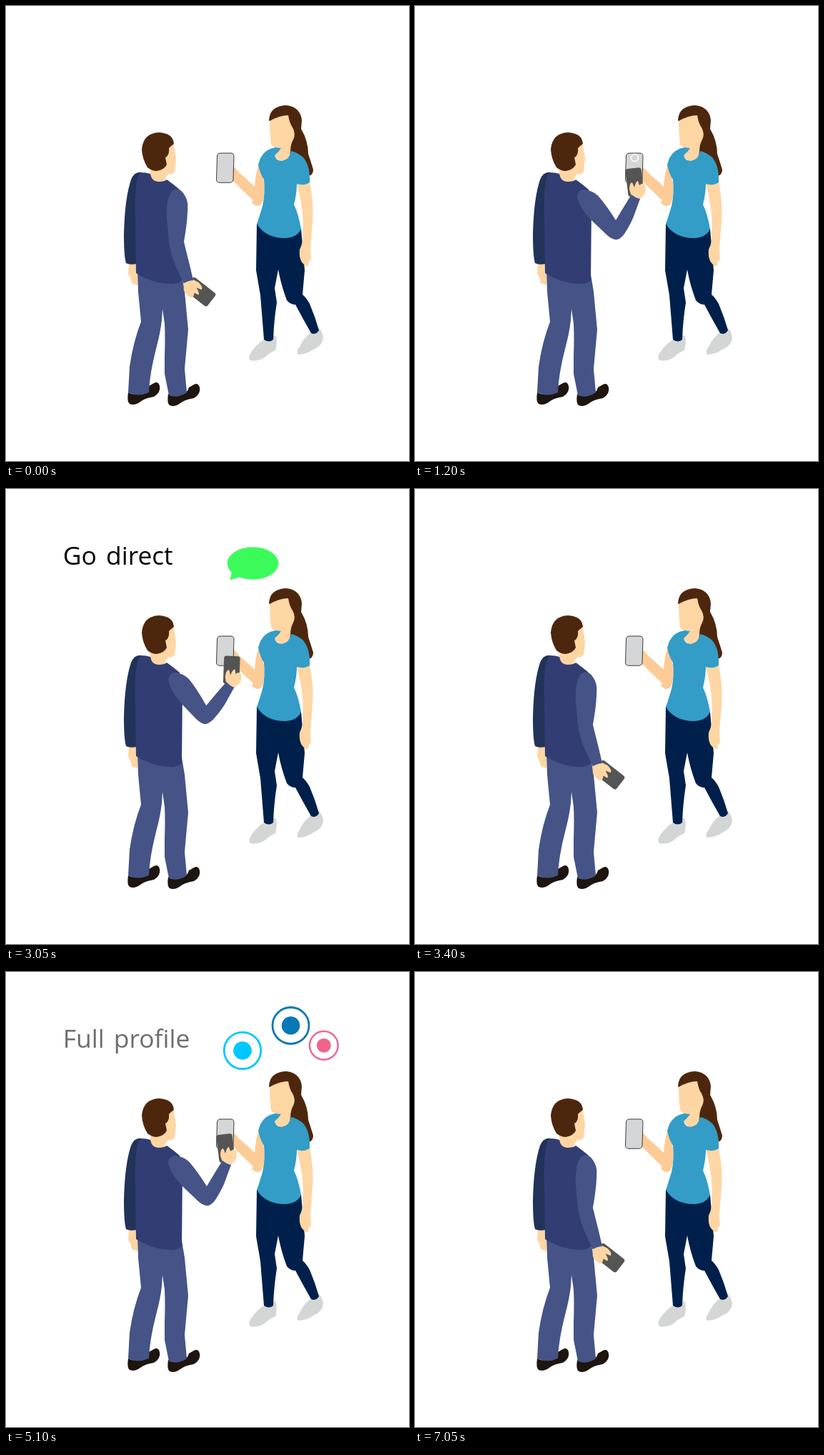
Recreate the animation shown at these times as an HTML page with a canvas. Size 564 by 637 pixels, loop 7750 ms.

```html
<!DOCTYPE html>
<html lang="en">
<head>
<meta charset="utf-8">
<title>Phone to phone</title>
<style>
html, body { margin: 0; width: 100%; height: 100%; overflow: hidden; background: #fff; }
canvas { display: block; width: 564px; height: 637px; }
</style>
</head>
<body>
<canvas id="stage" width="564" height="637"></canvas>
<script>
const ctx = document.getElementById('stage').getContext('2d');
const LOOP = 7750, STEP = 50, TAU = Math.PI * 2, DEG = Math.PI / 180;

const SKIN = '#fed6a4', TAN = '#fdcb96', HAIR = '#4d270d', DENIM = '#455386', SHIRT = '#323e73';
const TEAL = '#339dc7', NAVY = '#00204b', GREY = '#d4d6d6', BLACK = '#1d150e';

const part = (color, d) => ({ color, path: new Path2D(d) });

const woman = [
  part(HAIR, 'M368 160Q369 140 392 139Q412 141 414 160L413 172Q423 189 423 207Q427 219 430 229Q430 236 424 238L396 206L380 175Z'),
  part(SKIN, 'M369 161Q383 153 395 153Q397 165 401 170Q406 179 402 187Q398 194 398 204L396 214L386 219L375 210L385 199Q376 200 371 194Q369 178 369 161Z'),
  part(TAN, 'M316 225L320 226Q326 234 334 240L348 253Q349 235 354 221L361 246Q363 270 357 278Q350 283 344 275L346 272Q332 259 316 243Z'),
  part(GREY, 'M361 467Q350 474 343 485Q338 492 342 496Q352 498 362 492Q368 486 377 482Q380 472 378 462L372 460Z'),
  part(GREY, 'M427 457Q417 464 411 477Q405 484 409 488Q420 488 430 481Q443 476 444 464Q443 455 436 449Z'),
  part(NAVY, 'M351 305L350 370L356 405L361 467Q368 472 374 467Q375 440 379 415L376 395L381 369Q385 391 393 412Q398 418 405 418Q415 437 427 458Q434 461 438 454Q433 436 425 417Q420 408 415 404L418 370L413 312Z'),
  part(SKIN, 'M407 249L425 247Q431 275 429 302L426 340L427 356L424 357L423 364Q418 365 413 357Q410 350 411 341Q417 328 415 318Q418 290 407 249Z'),
  part(TEAL, 'M377 198Q363 200 356 213L353 222Q356 236 361 243Q363 262 359 280Q354 297 351 305Q363 325 391 325Q408 324 413 312Q409 290 403 278Q407 262 407 249Q418 252 425 247Q426 224 416 212Q408 205 399 203Q397 215 386 217Q377 216 376 209Q382 204 385 199Z')
];

const man = [
  part(SKIN, 'M172 359L171 375L174 380L176 388L184 391L185 360Z'),
  part(DENIM, 'M184 370L185 400L189 442Q178 470 173 505L171 541Q185 548 200 541Q201 515 210 480Q216 458 218 440L219 424L222 445Q223 465 222 490L222 515L228 545Q240 550 253 541L250 508L255 453L250 400L246 376Z'),
  part('#22335a', 'M190 233Q180 231 175 243Q166 270 165 320Q165 350 168 360Q173 363 183 361L190 280Z'),
  part(SKIN, 'M226 196Q233 190 235 195L237 208L238 214L236 232Q232 237 228 235Q223 238 222 247L202 245L202 226Z'),
  part(HAIR, 'M190 201Q192 178 214 177Q234 178 235 193Q232 195 228 199Q229 206 225 211L223 212L225 222Q222 229 211 231Q204 231 198 226Q191 215 190 201Z'),
  part(SHIRT, 'M188 233Q197 233 202 235Q204 246 213 246Q222 246 225 243Q235 250 243 257L247 280L246 384Q240 390 229 389Q204 388 182 374L181 300Q179 245 188 233Z')
];

const shoe = part(BLACK, 'M171 541Q169 554 173 557Q180 560 188 554Q194 549 207 547Q217 541 215 532Q213 525 207 528L200 532Q198 542 185 543Q178 545 171 541Z');

// the near arm, drawn in its raised pose
const upperArm = part(DENIM, 'M227 267Q228 257 237 257Q248 258 256 265.5Q268 279 281 300L292 318Q287 327 281 327Q274 326 268 320L247 300Q229 281 227 267Z');
const forearm = part(DENIM, 'M303 264Q294 278 281 300L270 318Q276 327 282 327Q288 326 293 319Q304 302 308 289L315 270Q309 269 303 264Z');
const hand = part(SKIN, 'M303 266L300 257Q300 247 304 247L307 254Q309 245 312 245L314 251Q319 246 322 251Q324 259 321 264L314 271Z');
const SHOULDER = { x: 238.5, y: 269.5 }, ELBOW = { x: 281, y: 314 };

const SOURCE = { x: 308.5, y: 246 };
const badges = [
  { x: 331, y: 110, r: 25.7, color: '#00c8ff', start: 4600, end: 4900, back: 6400 },
  { x: 398.5, y: 75, r: 25.5, color: '#0a78b5', start: 4700, end: 5000, back: 6450 },
  { x: 467.5, y: 79, r: 23.2, color: '#f0648c', start: 4800, end: 5150, back: 6500 }
];

const ramp = (t, a, b) => Math.min(1, Math.max(0, (t - a) / (b - a)));
const ease = p => 0.3 * p + 0.7 * p * p * (3 - 2 * p);
const pulse = (t, inA, inB, outA, outB) => t < outA ? ramp(t, inA, inB) : 1 - ramp(t, outA, outB);

function fill(p) {
  ctx.fillStyle = p.color;
  ctx.fill(p.path);
}

function circle(x, y, r) {
  ctx.beginPath();
  ctx.arc(x, y, r, 0, TAU);
}

function rotateAbout(p, angle, scale = 1) {
  ctx.translate(p.x, p.y);
  ctx.rotate(angle);
  ctx.scale(scale, scale);
  ctx.translate(-p.x, -p.y);
}

function drawDarkPhone() {
  ctx.save();
  ctx.translate(307.5, 246.5);
  ctx.rotate(-7 * DEG);
  ctx.fillStyle = '#545554';
  ctx.beginPath();
  ctx.roundRect(-11.2, -19.5, 22.4, 39, 3.5);
  ctx.fill();
  ctx.restore();
}

function drawArm(lift) {
  const low = 1 - lift;
  ctx.save();
  rotateAbout(SHOULDER, low * 41 * DEG);
  fill(upperArm);
  rotateAbout(ELBOW, low * 94 * DEG, 1 + 0.04 * low);
  drawDarkPhone();
  fill(hand);
  fill(forearm);
  ctx.restore();
}

function drawLightPhone() {
  ctx.save();
  ctx.transform(1, 0, -0.03, 1, 6.8, 0);
  ctx.beginPath();
  ctx.roundRect(295, 206, 23.5, 41.3, 4.5);
  ctx.fillStyle = '#d5d6d7';
  ctx.fill();
  ctx.strokeStyle = '#3c3c3c';
  ctx.lineWidth = 1;
  ctx.stroke();
  ctx.restore();
}

function drawRing(t) {
  if (t < 1150 || t > 1400) return;
  const p = ramp(t, 1150, 1400);
  ctx.save();
  ctx.globalAlpha = 1 - p * p;
  ctx.strokeStyle = '#fff';
  ctx.lineWidth = 1.5;
  circle(307.5, 212.5, 3 + 10 * p);
  ctx.stroke();
  ctx.restore();
}

// grows a shape out of the phone towards its resting place
function emerge(x, y, s, draw) {
  if (s <= 0) return;
  ctx.save();
  ctx.translate(SOURCE.x + (x - SOURCE.x) * s, SOURCE.y + (y - SOURCE.y) * s);
  ctx.scale(s, s);
  draw();
  ctx.restore();
}

function drawBubble() {
  ctx.fillStyle = '#3bfb5b';
  ctx.beginPath();
  ctx.ellipse(0, 0, 35.8, 22.8, 0, 0, TAU);
  ctx.fill();
  ctx.beginPath();
  ctx.moveTo(-29, 10);
  ctx.lineTo(-32, 23.5);
  ctx.lineTo(-15, 18);
  ctx.fill();
}

function drawBadge(b) {
  circle(0, 0, b.r);
  ctx.fillStyle = '#fff';
  ctx.fill();
  ctx.strokeStyle = b.color;
  ctx.lineWidth = 2.8;
  ctx.stroke();
  circle(0, 0, b.r * 0.5);
  ctx.fillStyle = b.color;
  ctx.fill();
}

function caption(text, alpha) {
  if (alpha <= 0) return;
  ctx.save();
  ctx.globalAlpha = alpha;
  ctx.fillStyle = '#000';
  ctx.font = '35.4px "Open Sans", "Noto Sans", sans-serif';
  ctx.wordSpacing = '4px';
  ctx.fillText(text, 79.7, 106);
  ctx.restore();
}

function render(t) {
  ctx.fillStyle = '#fff';
  ctx.fillRect(0, 0, 564, 637);

  woman.forEach(fill);
  drawLightPhone();
  drawRing(t);

  fill(shoe);
  ctx.save();
  ctx.translate(56, 2);
  fill(shoe);
  ctx.restore();
  man.forEach(fill);

  const lift = t < 3900 ? pulse(t, 600, 1000, 3000, 3400) : pulse(t, 4350, 4750, 6650, 7050);
  drawArm(ease(lift));

  emerge(345.5, 104, pulse(t, 1400, 1750, 3050, 3350), drawBubble);
  for (const b of badges) {
    emerge(b.x, b.y, pulse(t, b.start, b.end, b.back, b.back + 300), () => drawBadge(b));
  }

  caption('Go direct', pulse(t, 1450, 1850, 3050, 3350));
  caption('Full profile', pulse(t, 4900, 5250, 6400, 6700));
}

const begin = performance.now();
function tick() {
  const t = (performance.now() - begin) % LOOP;
  render(Math.floor(t / STEP) * STEP);
  requestAnimationFrame(tick);
}
tick();
</script>
</body>
</html>
```
